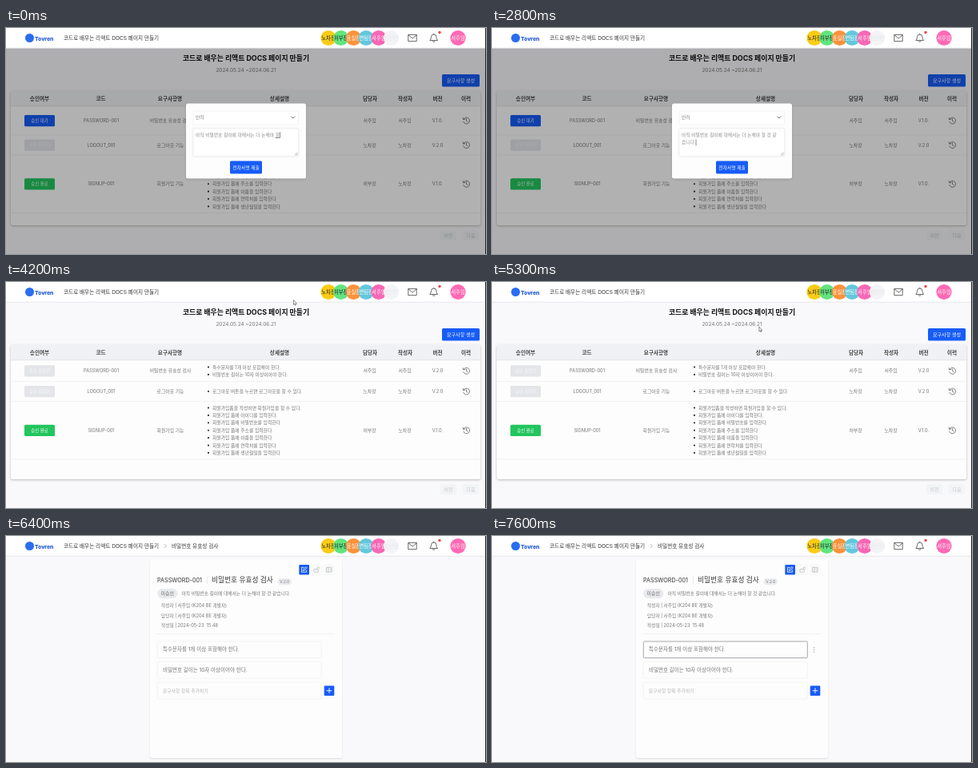
An HTML page with a canvas that plays this animation: 600x283 px, repeating every 7.7 s.

```html
<!DOCTYPE html>
<html lang="ko">
<head>
<meta charset="utf-8">
<title>요구사항</title>
<style>
html, body { margin: 0; width: 100%; height: 100%; overflow: hidden; background: #f9f9fb; }
canvas { display: block; width: 600px; height: 283px; }
</style>
</head>
<body>
<canvas id="stage"></canvas>
<script>
const W = 600, H = 283, LOOP = 7700;
const BLUE = '#175cf6', GREEN = '#22c55e', PINK = '#ff69b4', GREY = '#e4e5e9';
const FONT = "Inter, 'Noto Sans CJK KR', 'Noto Sans CJK', sans-serif";
const TITLE = '코드로 배우는 리액트 DOCS 페이지 만들기';
const REQ = '비밀번호 유효성 검사';
const RULES = ['특수문자를 1개 이상 포함해야 한다.', '비밀번호 길이는 10자 이상이어야 한다.'];
const LINE1 = '아직 비밀번호 길이에 대해서는 더 논해야 ';

const canvas = document.getElementById('stage');
const ctx = canvas.getContext('2d');
const dpr = window.devicePixelRatio || 1;
canvas.width = W * dpr;
canvas.height = H * dpr;

// ---- helpers ----
function text(s, x, y, size, color = '#757578', weight = 400, align = 'left') {
  ctx.font = `${weight} ${size}px ${FONT}`;
  ctx.textAlign = align;
  ctx.fillStyle = color;
  ctx.fillText(s, x, y + size * 0.36);
}
const mid = (s, x, y, size, color, weight) => text(s, x, y, size, color, weight, 'center');

function box(x, y, w, h, fill, r = 1.5, border, lw = 0.7) {
  ctx.beginPath();
  ctx.roundRect(x, y, w, h, r);
  if (fill) { ctx.fillStyle = fill; ctx.fill(); }
  if (border) { ctx.strokeStyle = border; ctx.lineWidth = lw; ctx.stroke(); }
}
function card(x, y, w, h, blur = 4, alpha = 0.2) {
  ctx.save();
  ctx.shadowColor = `rgba(0,0,0,${alpha})`;
  ctx.shadowBlur = blur * dpr;
  ctx.shadowOffsetY = dpr;
  box(x, y, w, h, '#fdfdfd', 2.5);
  ctx.restore();
}
function disc(x, y, r, fill) {
  ctx.beginPath();
  ctx.arc(x, y, r, 0, 7);
  ctx.fillStyle = fill;
  ctx.fill();
}
function path(d, x, y, color, lw = 0.9, fill) {
  const p = new Path2D(d);
  ctx.save();
  ctx.translate(x, y);
  ctx.lineCap = ctx.lineJoin = 'round';
  if (fill) { ctx.fillStyle = fill; ctx.fill(p); }
  ctx.strokeStyle = color;
  ctx.lineWidth = lw;
  ctx.stroke(p);
  ctx.restore();
}

// ---- header ----
const AVATARS = [
  ['노차장', '#facc15', '#222'], ['허부장', '#62e47f', '#222'], ['표실장', '#fb923c', '#fff'],
  ['변팀장', '#62c8dc', '#fff'], ['서주임', '#f867b5', '#fff'], ['민인턴', '#f3f4f6', '#e3e5e9']
];
function header(detail) {
  box(0, 0, W, 25, '#fff', 0);
  box(0, 24.7, W, 0.7, '#dfe1e5', 0);
  disc(29.5, 12.5, 5.5, '#2a6df0');
  text('Tovren', 36, 13.5, 6.8, '#1d55d8', 800);
  text(TITLE, 72, 12.5, 6.6, '#333');
  if (detail) {
    path('M-1 -2L1 0L-1 2', 199.5, 12.5, '#999', 0.7);
    text(REQ, 207, 12.5, 6.6, '#333');
  }
  AVATARS.forEach(([name, bg, fg], i) => {
    const x = 403 + i * 15.7;
    disc(x, 12.5, 9.6, bg);
    mid(name, x, 12.5, 6.3, fg);
  });
  path('M-5 -4H5V4.2H-5ZM-5 -3.4L0 0.6L5 -3.4', 508.2, 12.4, '#444', 0.8);
  path('M-4.6 2.8Q-3.2 1.4 -3.2 -1.2A3.2 3.2 0 0 1 3.2 -1.2Q3.2 1.4 4.6 2.8ZM-1.4 4.4Q0 5.8 1.4 4.4M0 -5.2V-4.4', 534.7, 12.4, '#444', 0.8);
  disc(542, 5.5, 1.7, '#ef4444');
  disc(565, 12.5, 9.6, PINK);
  mid('서주임', 565, 12.5, 6.3, '#fff');
}

// ---- list page ----
const FIELDS = ['아이디를', '비밀번호를', '주소를', '이름을', '연락처를', '생년월일을'];
const SIGNUP = ['회원가입폼을 작성하면 회원가입을 할 수 있다.',
  ...FIELDS.map((f, i) => `회원가입 폼에 ${f} 입력한다${i ? '' : '.'}`)];
const HEADS = [['승인여부', 42], ['코드', 118.5], ['요구사항명', 205], ['상세설명', 342],
  ['담당자', 455], ['작성자', 499], ['버전', 539.5], ['이력', 575]];
const STATES = {
  wait: ['승인 대기', BLUE, '#fff'],
  none: ['승인 요청전', GREY, '#f8f8fa'],
  done: ['승인 완료', GREEN, '#fff']
};
function rowsAt(sent) {
  return [
    { h: sent ? 26.5 : 36, state: sent ? 'none' : 'wait', code: 'PASSWORD-001', name: REQ, list: RULES,
      who: ['서주임', '서주임'], ver: sent ? 'V.2.0' : 'V.1.0.' },
    { h: 25, state: 'none', code: 'LOGOUT_001', name: '로그아웃 기능',
      list: ['로그아웃 버튼을 누르면 로그아웃을 할 수 있다.'], who: ['노차장', '노차장'], ver: 'V.2.0' },
    { h: 72.5, state: 'done', code: 'SIGNUP-001', name: '회원가입 기능', list: SIGNUP,
      who: ['허부장', '노차장'], ver: 'V.1.0.' }
  ];
}
function history(x, y) {
  path('M-3.6 -1.6A4 4 0 1 1 -3.7 1.5M-4.3 -3.6L-3.8 -1.3L-1.6 -1.8M0 -2.2V0.3L1.7 1.2', x, y, '#666', 0.8);
}
function listPage(sent, pointer) {
  mid(TITLE, 300, 37.7, 8.85, '#111', 700);
  mid('2024.05.24 ~2024.06.21', 300, 52.3, 6.5, '#777');
  box(545, 58, 47, 15.5, BLUE);
  mid('요구사항 생성', 568.5, 65.8, 6.05, '#fff', 400);
  card(6, 78.5, 587, 168.5, 3, 0.25);
  box(6, 78.5, 587, 19.5, '#f0f1f4', [2.5, 2.5, 0, 0]);
  HEADS.forEach(([s, x]) => mid(s, x, 88.3, 6.6, '#444', 600));
  let y = 98;
  box(6, y - 0.4, 587, 0.7, '#dddfe3', 0);
  for (const r of rowsAt(sent)) {
    const c = y + r.h / 2;
    if (pointer && pointer.y >= y && pointer.y < y + r.h) box(6, y, 587, r.h, '#f5f6f7', 0);
    const [label, bg, fg] = STATES[r.state];
    box(23, c - 7, 38, 14.3, bg);
    mid(label, 42, c, 5.4, fg, 500);
    mid(r.code, 119, c, 5.65);
    mid(r.name, 205.5, c, 5.85);
    r.list.forEach((s, i) => {
      const ly = c + (i - (r.list.length - 1) / 2) * 9.4;
      disc(253, ly, 1.1, '#333');
      text(s, 258, ly, 5.8);
    });
    mid(r.who[0], 454.5, c, 5.85);
    mid(r.who[1], 498.5, c, 5.85);
    mid(r.ver, 539.5, c, 5.7);
    history(575.5, c);
    y += r.h;
    box(6, y - 0.3, 587, 0.6, '#e6e8eb', 0);
  }
  [['이전', 553], ['다음', 581]].forEach(([s, x]) => {
    box(x - 10, 253, 20, 13, '#f3f4f6');
    mid(s, x, 259.5, 6, '#c3c6cc');
  });
}

// ---- reject dialog ----
const TYPING = [[0, '할'], [300, '할 '], [500, '할 ㄱ'], [600, '할 거'], [700, '할 것'], [900, '할 것 '],
  [1000, '할 것 ㄱ'], [1100, '할 것 가'], [1200, '할 것 같'], [1400, '할 것 같|ㅅ'], [1500, '할 것 같|스'],
  [1600, '할 것 같|습'], [1700, '할 것 같|습니'], [2000, '할 것 같|습니다'], [2600, '할 것 같|습니다.']];

function dialog(t) {
  box(0, 25.3, W, H, 'rgba(0,0,0,.3)', 0);
  card(225, 94.5, 150, 94, 3, 0.15);
  box(234, 104, 131.5, 17, '#fff', 1.5, '#eceef1');
  text('반려', 237, 112.1, 5.8, '#8a8a8c');
  path('M-2 -1L0 1L2 -1', 358.7, 112, '#555', 0.9);
  ctx.save();
  ctx.shadowColor = 'rgba(0,0,0,.12)';
  ctx.shadowBlur = 3 * dpr;
  box(234, 126, 131.5, 34.5, '#fff', 1.5);
  ctx.restore();
  box(234, 126, 131.5, 34.5, null, 1.5, '#eceef1');
  path('M-3 0L0 -3M-1 0L0 -1', 364.2, 159.2, '#777', 0.6);

  const typed = TYPING.filter(k => k[0] <= t).pop()[1];
  const lines = (LINE1 + typed).split('|');
  lines.forEach((s, i) => text(s, 237, 133.9 + i * 9.4, 5.75, '#8a8a8c'));
  if (t < 3600) {
    const last = lines[lines.length - 1], y = 133.9 + (lines.length - 1) * 9.4;
    const end = 237 + ctx.measureText(last).width;
    ctx.fillStyle = '#444';
    if (!/[ .]$/.test(last)) ctx.fillRect(end - 5.3, y + 3.3, 5.3, 0.6);
    ctx.fillRect(end + 0.2, y - 3.8, 0.6, 7.7);
  }
  box(280, 166.5, 40, 16, BLUE);
  mid('전자서명 제출', 300, 174.5, 5.8, '#fff', 400);
}

// ---- detail page ----
function detailPage(active) {
  card(180, 29, 240, 249, 2, 0.12);
  box(366.3, 36, 12.7, 12.5, BLUE, 1);
  path('M-0.5 -2.8H-3V3H2.8V0.6M-1 1L-0.7 -0.7L2.4 -3.6L3.6 -2.4L0.6 0.6Z', 372.5, 42.2, '#fff', 0.8);
  box(382.5, 36.3, 12, 12, '#fdfdfd', 1, '#f0f1f3');
  path('M-3 -0.4H2V3.2H-3ZM0.6 -0.4V-1.6A1.5 1.5 0 0 1 3.6 -1.6V-1', 388.3, 42, '#b0b0b3', 0.7);
  box(398, 36.3, 12, 12, '#fdfdfd', 1, '#f0f1f3');
  path('M-3.2 -3H3.2V3H-3.2ZM-1.2 -3V3M0.6 -1H2M0.6 1H2', 404, 42.2, '#b0b0b3', 0.7);

  text('PASSWORD-001', 189, 55.3, 7.2, '#333', 400);
  box(251, 50.5, 0.6, 9.5, '#dfe0e3', 0);
  text(REQ, 257, 55.2, 8.7, '#333', 400);
  box(339.5, 53, 17.5, 8.5, '#ebecef', 4.2);
  mid('V.2.0', 348.2, 57.3, 5, '#777');
  box(189, 66, 25.5, 12, '#e9eaed', 6);
  mid('미승인', 201.8, 72, 6, '#666');
  text(LINE1 + '할 것 같습니다.', 219.5, 72, 5.75);
  ['작성자 | 서주임 (K204 BE 개발자)', '담당자 | 서주임 (K204 BE 개발자)', '작성일 | 2024-05-23  15:48']
    .forEach((s, i) => text(s, 194, 87.3 + i * 12.5, 5.65));
  box(189, 122.3, 222, 0.6, '#eceef0', 0);

  RULES.forEach((s, i) => {
    const y = 132 + i * 25.5, on = i === active;
    box(189.3, y, 205, 20.7, '#fdfdfd', 1.5, on ? '#9a9ca2' : '#eff0f2', on ? 0.9 : 0.7);
    text(s, 196, y + 10.1, 6.5);
    if (on) [-2.6, 0, 2.6].forEach(d => disc(402.5, y + 10.5 + d, 0.6, '#888'));
  });
  box(189.3, 183, 205, 21, '#fdfdfd', 1.5, '#eff0f2');
  text('요구사항 항목 추가하기', 196, 193.7, 5.8, '#b0b0b3');
  box(397.7, 187.5, 12.6, 12.5, BLUE, 1);
  path('M-3 0H3M0 -3V3', 404, 193.7, '#fff', 0.9);
}

// ---- pointer ----
const TRACK = [[3200, 335, 158], [3500, 303, 176], [3700, 303, 176], [4000, 361, 22], [4100, 361, 22],
  [4200, 361, 26], [5000, 361, 26], [5700, 296, 111], [6200, 291, 115], [6400, 291, 115]];
function pointerAt(t) {
  const i = TRACK.findIndex(k => k[0] > t);
  if (i < 1) return null;
  const [t0, x0, y0] = TRACK[i - 1], [t1, x1, y1] = TRACK[i];
  const u = (t - t0) / (t1 - t0), e = u * u * (3 - 2 * u);
  return { x: x0 + (x1 - x0) * e, y: y0 + (y1 - y0) * e };
}
function drawPointer({ x, y }) {
  const arrow = y > 25 && y < 98;
  path(arrow ? 'M-1.5 -3V2.4L-0.3 1.4L0.6 3.2L1.4 2.8L0.6 1.1H2Z'
    : 'M-1 0.4V-2.4A0.6 0.6 0 0 1 0.2 -2.4V-0.6L2.4 0V1.6L1.8 3.4H-0.8L-2.4 1Q-2 0 -1 0.8Z', x, y, '#444', 0.6, '#fff');
}

function draw(t) {
  ctx.setTransform(dpr, 0, 0, dpr, 0, 0);
  box(0, 0, W, H, '#f9f9fb', 0);
  const detail = t >= 6400, sent = t >= 4200;
  const pointer = pointerAt(t);
  if (detail) detailPage(t < 6600 ? -1 : t >= 6800 && t < 7300 ? 1 : 0);
  else listPage(sent, sent && pointer);
  if (!sent) dialog(t);
  header(detail);
  if (pointer) drawPointer(pointer);
  box(W - 1, 0, 1, H, '#222', 0);
}

// The picture advances in steps of 100 ms.
const start = performance.now();
function tick() {
  const t = (performance.now() - start) % LOOP;
  draw(Math.floor(t / 100) * 100);
  requestAnimationFrame(tick);
}
tick();
</script>
</body>
</html>
```
